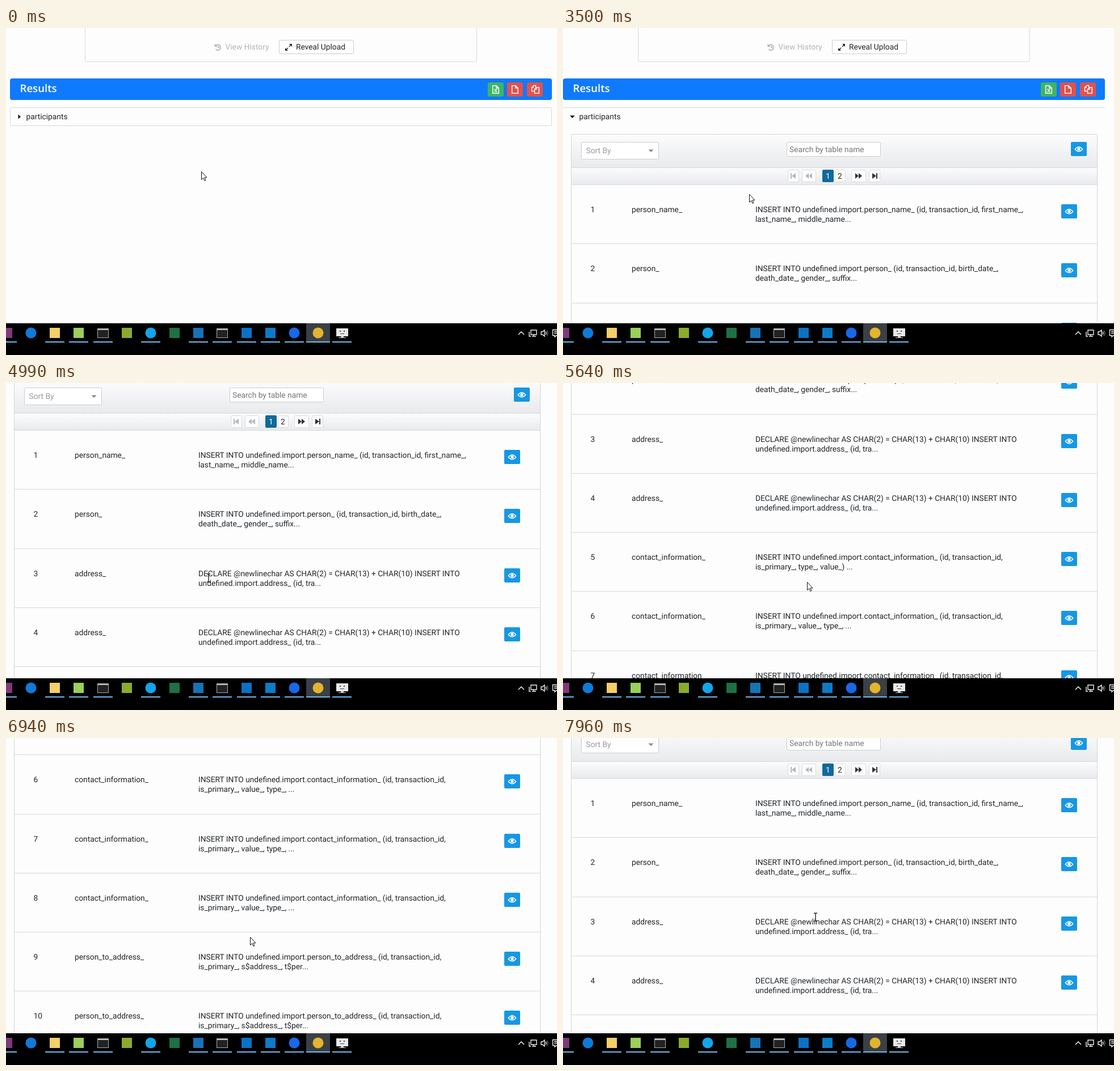
An HTML page that plays this animation: 971x577 px, repeating every 8000 ms.

```html
<!DOCTYPE html>
<html lang="en">
<head>
<meta charset="utf-8">
<title>Results list</title>
<style>
  html, body { margin: 0; width: 100%; height: 100%; overflow: hidden; background: #fdfdfd; }
  svg { display: block; width: 971px; height: 577px; }
  text { font: 13.77px Roboto, sans-serif; fill: #212529; white-space: pre; text-rendering: geometricPrecision; }
  .title { font: 600 18.6px "Open Sans", sans-serif; fill: #fff; }
  .light { fill: #fff; }
  .muted { fill: #b4b4b4; }
  .hint { fill: #999; }
  .search { fill: #757575; }
  .line { fill: none; stroke-width: 1.4; }
</style>
</head>
<body>
<svg id="stage" viewBox="0 0 971 577" xmlns="http://www.w3.org/2000/svg"></svg>
<script>
const LOOP = 8000;
const TICK = 75;          // the screen refreshes once per tick
const TICK_PHASE = 40;
const OPEN_AT = 2665;
const NOTCH = 86;         // pixels scrolled per wheel notch
const NOTCH_TIME = 140;
const ROW_TOP = 276, ROW_PITCH = 104.25;
const BLUE = '#1797e3', EDGE = '#d6d8da';

// Wheel swipes: a number of notches at a steady gap
const SWIPES = [
  { start: 4466, count: 1, gap: 0, turn: 1 },
  { start: 4777.5, count: 4, gap: 200, turn: 1 },
  { start: 5850, count: 5, gap: 70, turn: 1 },
  { start: 6770.5, count: 5, gap: 166, turn: -1 },
  { start: 7712, count: 3, gap: 82, turn: -1 }
];
const HOME = { x: 344, y: 253 };
const GLIDES = [
  { start: 400, end: 1260, x: 120, y: 104 },
  { start: 1260, end: 2000, x: 22, y: 157 },
  { start: 3000, end: 3240, x: 314, y: 286 },
  { start: 3380, end: 3800, x: 395, y: 330 },
  { start: 3800, end: 4170, x: 357, y: 344 },
  { start: 5100, end: 5500, x: 430, y: 351 },
  { start: 7670, end: 7890, x: 445, y: 316 }
];

const insert = (table, fields, rest) =>
  [table, `INSERT INTO undefined.import.${table} (id, transaction_id,${fields}`, rest];
const address = ['address_', 'DECLARE @newlinechar AS CHAR(2) = CHAR(13) + CHAR(10) INSERT INTO',
  'undefined.import.address_ (id, tra...'];
const contact = insert('contact_information_', '', 'is_primary_, value_, type_, ...');
const link = insert('person_to_address_', '', 'is_primary_, s$address_, t$per...');
const ROWS = [
  insert('person_name_', ' first_name_,', 'last_name_, middle_name...'),
  insert('person_', ' birth_date_,', 'death_date_, gender_, suffix...'),
  address, address,
  insert('contact_information_', '', 'is_primary_, type_, value_) ...'),
  contact, contact, contact, link, link
];

const box = (x, y, w, h, fill, stroke = '', r = 0) => stroke
  ? `<rect x="${x + .5}" y="${y + .5}" width="${w - 1}" height="${h - 1}" rx="${r}" fill="${fill}" stroke="${stroke}"/>`
  : `<rect x="${x}" y="${y}" width="${w}" height="${h}" rx="${r}" fill="${fill}"/>`;
const disc = (x, y, r, fill) => `<circle cx="${x}" cy="${y}" r="${r}" fill="${fill}"/>`;
const shape = (d, fill) => `<path d="${d}" fill="${fill}"/>`;
const line = (d, stroke) => `<path d="${d}" class="line" stroke="${stroke}"/>`;
const rule = (x, y, w, fill = EDGE) => box(x, y, w, 1, fill);
const text = (x, y, s, cls = '') => `<text x="${x}" y="${y}" class="${cls}">${s}</text>`;
const at = (x, y, body) => `<g transform="translate(${x} ${y})">${body}</g>`;
const group = (id, body) => `<g id="${id}">${body}</g>`;

const eyeButton = (x, y) => at(x, y, box(0, 0, 28, 25, BLUE, '', 2) +
  line('M7.3 13Q14 4.5 20.7 13Q14 20.5 7.3 13Z', '#fff') + disc(14, 12.6, 2.7, '#fff'));

const sheet = 'M.7.7H7L11.3 5V14.3H.7ZM7 .7V5H11.3';
const fileButton = (x, fill, d) => box(x, 96, 28, 25, fill, '', 3) + at(x + 8, 101, line(d, '#fff'));

function banner() {
  return box(7, 89, 955, 38, '#0f7afd', '', 4) + text(24.5, 112.5, 'Results', 'title') +
    fileButton(849, '#3fb565', sheet + 'M3.7 6.5L8.3 12M8.3 6.5L3.7 12') +
    fileButton(883, '#e0524e', sheet) +
    fileButton(918, '#e0524e', 'M4 3.7H.5V10.5H5M.5 4L4 .5H7.5V4M5.5 7L9 3.7H13.3V14.3H5.5ZM9 4V7H5.5');
}

function topPanel() {
  return box(139, -20, 691, 80, '#fdfdfd', EDGE, 3) +
    line('M369.5 31A5 5 0 1 1 369.5 37.5M368.3 28.5V32.3H372M374 31V34.5H376.5', '#aaa') +
    text(386.5, 38, 'View History', 'muted') +
    box(481, 21, 132, 25, '#fff', '#c9ccd0', 2) +
    line('M494 38L497 35M499 33L502 30', '#212529') +
    shape('M492 35V40H497ZM499 28H504V33Z', '#212529') +
    text(511, 38, 'Reveal Upload');
}

function pager() {
  const dim = '#b5b8bc', dark = '#333';
  const button = (x, w, icon, fill) => box(x, 173, w, 22, '#fcfcfc', '#d9dbde', 2) + shape(icon, fill);
  return button(396, 20, 'M401 179H403V189H401ZM403 184L410 179V189Z', dim) +
    button(421, 25, 'M427 184L433 179V189ZM433 184L439 179V189Z', dim) +
    box(457, 173, 20, 22, '#0f6a9b', '', 2) + text(463, 189, '1', 'light') +
    box(479, 173, 19, 22, '#fcfcfc', '#d9dbde', 2) + text(484, 189, '2') +
    button(508, 26, 'M515 179L521 184L515 189ZM521 179L527 184L521 189Z', dark) +
    button(539, 20, 'M545 179L552 184L545 189ZM552 179H554V189H552Z', dark);
}

function table() {
  const rows = ROWS.map(([name, first, second], i) => at(0, Math.round(199 + i * ROW_PITCH),
    rule(14, 0, 928) + text(48.5, 49, i + 1) + text(121, 49, name) +
    text(339, 49, first) + text(339, 66, second) + eyeButton(878, 35)));
  return box(14, 110, 928, 90 + Math.round(ROW_PITCH * ROWS.length), '#fdfdfd', '#d3d5d8', 1) +
    box(15, 111, 926, 58, 'url(#shade)') + box(15, 170, 926, 29, 'url(#shade)') + rule(14, 169, 928) +
    box(32, 124, 137, 31, '#fff', '#c9cccf', 2) + text(40.5, 144, 'Sort By', 'hint') +
    shape('M150.5 137.5H159.5L155 142Z', '#888') +
    box(394, 124, 166, 26, '#fff', '#c9cccf', 2) + text(399, 141.5, 'Search by table name', 'search') +
    eyeButton(895, 124) + pager() + rows.join('');
}

const square = fill => box(-9, 529, 18, 18, fill);
const round = fill => disc(0, 538, 9.5, fill);
const terminal = box(-10, 530, 20, 17, '#222', '#aaa') + box(-9, 531, 18, 2, '#bbb');
const monitor = box(-10, 530, 21, 14, '#e8e8e8') + box(-2, 544, 5, 2, '#ccc') + box(-6, 546, 13, 1, '#ccc') +
  box(-4, 534, 2, 2, '#444') + box(3, 534, 2, 2, '#444') + box(-3, 539, 7, 1, '#444');
const idle = icon => ({ icon, idle: true });
const APPS = [
  square('#80397b'), idle(round('#0f7bd8')), square('#f5cf68'), square('#9bd05a'), terminal,
  idle(square('#8cab2c')), round('#12a5ea'), idle(square('#1e7145')), square('#1673b8'), terminal,
  square('#0a72c6'), square('#0c7cc8'), round('#1769e8'), round('#e3b52f'), monitor
];

function taskbar() {
  const apps = APPS.map((app, i) => at(Math.round(2 + i * 42.15), 0,
    app.idle ? app.icon : app + box(-17, 553, 34, 2, '#76b9ed')));
  return box(0, 521, 971, 56, '#000') + box(529, 521, 42, 34, '#3b4046') +
    box(529, 553, 42, 2, '#76b9ed') + apps.join('') +
    line('M903 541L908 536L913 541', '#fff') +
    line('M925 533H935V541H925ZM930 541V544M927 544H934M922 536V544H925', '#eee') +
    line('M943 536H945.5L949 533V544L945.5 541H943ZM951 536Q953 538.5 951 541', '#eee') +
    line('M953 534Q957 538.5 953 543', '#777') +
    line('M972 532.5H963.5V542.5H967V545L970 542.5H972M966 535.5H972M966 538.5H972', '#eee');
}

const outlined = d => `<path d="${d}" fill="#fff" stroke="#111" stroke-linejoin="round"/>`;
const pointers = {
  arrow: outlined('M.5 .5V14.5L3.7 11.5L6 16.5L8 15.5L5.8 10.8H10Z'),
  hand: outlined('M-1.5 1.5Q0 -1 1.5 1.5V6L3.8 6.3L6.5 7L8.8 8.3Q9.5 12 7.5 15V19.5H-.5V17.5L-5 11.5Q-5 9 -2.8 10.2L-1.5 11.5Z') +
    line('M1.5 6V9M4 6.5V9.5M6.5 7V10', '#111'),
  ibeam: line('M-3 -7H-1L0 -6L1 -7H3M0 -6V6M-3 7H-1L0 6L1 7H3', '#222')
};

const stage = document.getElementById('stage');
stage.innerHTML = `<defs>
    <linearGradient id="shade" x2="0" y2="1"><stop stop-color="#fcfcfd"/><stop offset="1" stop-color="#e9eaed"/></linearGradient>
    <clipPath id="window">${box(0, 0, 971, 521, '#fff')}</clipPath>
  </defs>` + box(0, 0, 971, 577, '#fdfdfd') +
  `<g clip-path="url(#window)">` +
  group('page', topPanel() + banner() +
    group('closed', '<rect id="row" x="7.5" y="140.5" width="954" height="32" rx="2"/>' +
      shape('M21.5 152.5L26 156.5L21.5 160.5Z', '#111')) +
    group('opened', rule(7, 140, 955) + shape('M19 154.5H28L23.5 159Z', '#111') + at(7, 77, table())) +
    text(35.5, 161, 'participants') + group('underline', rule(32, 163, 77, '#212529'))) +
  group('status', box(-5, 502, 293, 25, '#f1f1f2', '#dcdcde', 3)) + '</g>' + taskbar() +
  group('pointer', Object.entries(pointers).map(([kind, art]) => group(kind, art)).join(''));

const $ = id => document.getElementById(id);
const show = (id, on) => $(id).setAttribute('visibility', on ? 'visible' : 'hidden');
const move = (id, x, y) => $(id).setAttribute('transform', `translate(${x} ${y})`);
const clamp = p => Math.min(1, Math.max(0, p));
const easeOut = p => 1 - (1 - clamp(p)) ** 3;
const easeInOut = p => clamp(p) ** 2 * (3 - 2 * clamp(p));

function scrollAt(t) {
  let top = 0;
  for (const { start, count, gap, turn } of SWIPES)
    for (let i = 0; i < count; i++) top += turn * NOTCH * easeOut((t - start - i * gap) / NOTCH_TIME);
  return Math.round(top);
}

function pointerAt(t) {
  let { x, y } = HOME;
  for (const glide of GLIDES) {
    const p = easeInOut((t - glide.start) / (glide.end - glide.start));
    x += (glide.x - x) * p;
    y += (glide.y - y) * p;
  }
  return { x: Math.round(x), y: Math.round(y) };
}

const overRow = ({ y }) => y >= 140 && y < 173;
const overLink = p => overRow(p) && p.x < 40;

function overText({ x, y }, scroll) {
  const inTable = y + scroll - ROW_TOP;
  const inRow = inTable % ROW_PITCH;
  return inTable > 0 && x >= 339 && x < 810 && inRow > 34 && inRow < 72;
}

function draw(time) {
  const t = TICK_PHASE + Math.floor((time - TICK_PHASE) / TICK) * TICK;
  const open = t >= OPEN_AT;
  const scroll = scrollAt(t);
  const pointer = pointerAt(t);
  const onLink = scroll === 0 && overLink(pointer);
  const kind = onLink ? 'hand' : open && overText(pointer, scroll) ? 'ibeam' : 'arrow';

  move('page', open ? -7 : 0, -scroll);
  show('closed', !open);
  show('opened', open);
  $('row').setAttribute('fill', overRow(pointer) ? '#ececee' : '#fdfdfd');
  $('row').setAttribute('stroke', overRow(pointer) ? '#bfc1c4' : EDGE);
  show('underline', onLink);
  show('status', onLink || overLink(pointerAt(t - 400)));
  move('pointer', pointer.x, pointer.y);
  for (const name in pointers) show(name, name === kind);
}

function frame() {
  draw(performance.now() % LOOP);
  requestAnimationFrame(frame);
}
frame();
</script>
</body>
</html>
```
